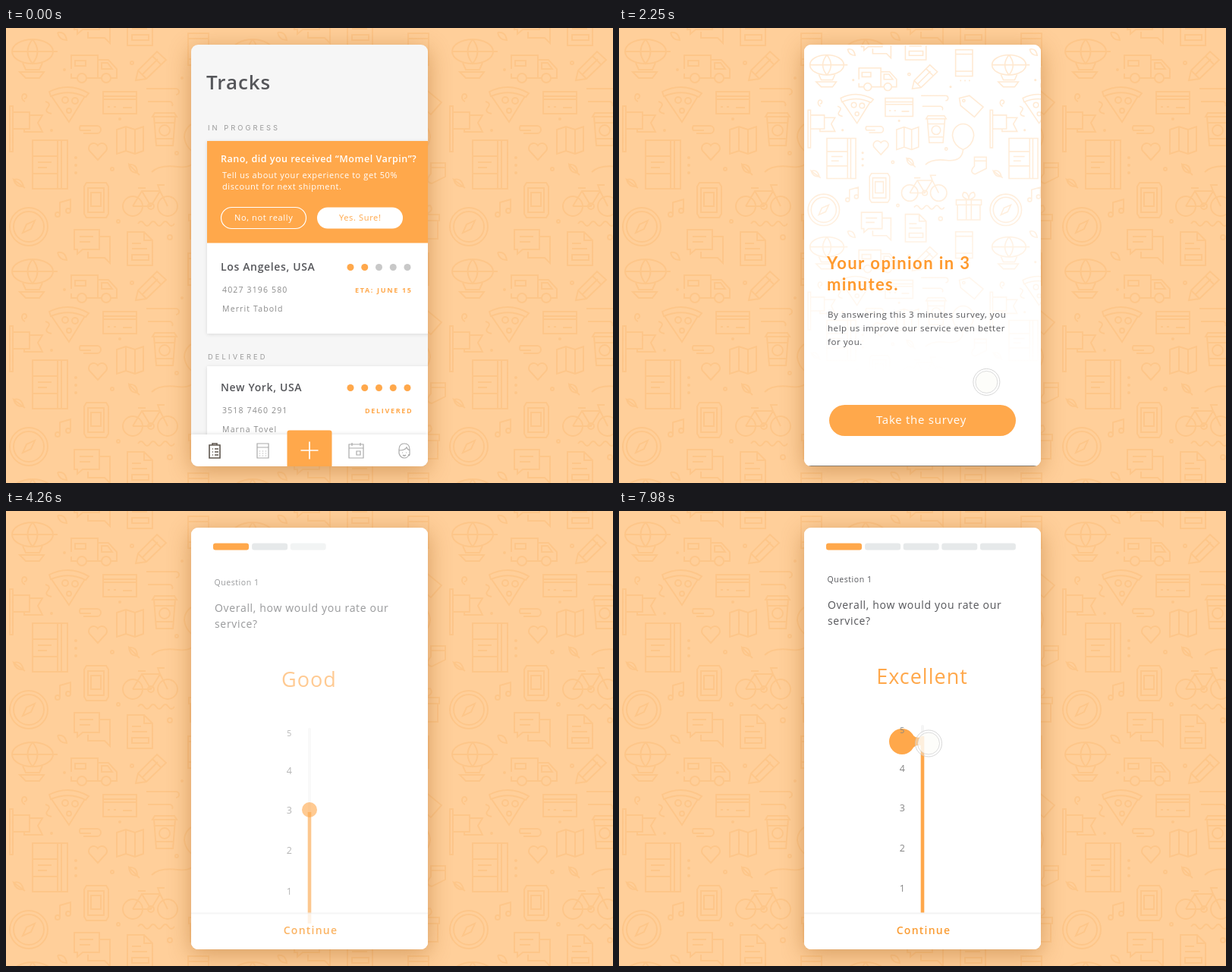
An HTML page with a canvas that plays this animation: 800 px wide and 600 px high, repeating every 8 s.

```html
<!DOCTYPE html>
<html lang="en">
<head>
<meta charset="utf-8">
<title>Delivery survey</title>
<style>
html, body { margin: 0; width: 100%; height: 100%; overflow: hidden; background: #ffcf9a; }
canvas { display: block; }
</style>
</head>
<body>
<canvas id="stage" width="800" height="600"></canvas>
<script>
const ctx = document.getElementById('stage').getContext('2d');
const LOOP = 8000, ORANGE = '#ffa84b', GREY = '#e6e9ea', INK = '#55565a';
const SANS = '"Open Sans", sans-serif';

// Timing helpers
const clamp = v => Math.max(0, Math.min(1, v));
const span = (t, start, end) => clamp((t - start) / (end - start));
const lerp = (a, b, p) => a + (b - a) * p;
const inOut = p => p < .5 ? 2 * p * p : 1 - 2 * (1 - p) ** 2;
const outQuart = p => 1 - (1 - p) ** 4;
const outBack = p => 1 + 2 * (p - 1) ** 3 + (p - 1) ** 2;

// Drawing helpers
function text(s, x, y, size, gap, color, weight = 400, font = SANS) {
  ctx.font = `${weight} ${size}px ${font}`;
  ctx.letterSpacing = gap + 'px';
  ctx.fillStyle = color;
  ctx.fillText(s, x, y);
}
function centered(...args) {
  ctx.textAlign = 'center';
  text(...args);
  ctx.textAlign = 'left';
}
function box(x, y, w, h, color, r = 0) {
  ctx.beginPath();
  ctx.roundRect(x, y, w, h, r);
  ctx.fillStyle = color;
  ctx.fill();
}
function disc(x, y, r, color) {
  ctx.beginPath();
  ctx.arc(x, y, r, 0, 7);
  ctx.fillStyle = color;
  ctx.fill();
}
function ring(x, y, r, color, width = 1) {
  ctx.beginPath();
  ctx.arc(x, y, r, 0, 7);
  line(null, color, width);
}
function line(path, color, width) {
  ctx.strokeStyle = color;
  ctx.lineWidth = width;
  path ? ctx.stroke(path) : ctx.stroke();
}
function shadow(color, blur = 0, dy = 0) {
  ctx.shadowColor = color;
  ctx.shadowBlur = blur;
  ctx.shadowOffsetY = dy;
}
// Runs draw with its own opacity and vertical shift
function layer(alpha, dy, draw) {
  if (alpha <= 0) return;
  ctx.save();
  ctx.globalAlpha *= alpha;
  ctx.translate(0, dy);
  draw();
  ctx.restore();
}

// Repeating doodle tile, 290 by 290
const TILE = 290;
const o = (x, y, r) => `M${x - r} ${y}a${r} ${r} 0 1 0 ${2 * r} 0a${r} ${r} 0 1 0 ${-2 * r} 0`;
const doodles = new Path2D([
  'M8 31a27 16 0 1 0 54 0a27 16 0 1 0-54 0M8 31h60M35 15q-13 16 0 32q13-16 0-32M22 46l4 9h18l4-9M18 58h32l-6 8h-18z', // airship
  'M94 66h-8v-6M86 54v-18h35v30h-15M121 42h14l11 12v12h-8M126 66h-5M126 46h8l6 8h-14zM91 43h14v7h-14z', o(100, 66, 6), o(132, 66, 6), // truck
  'M171 69l3-13l25-25l12 11l-26 25zM174 56l11 11M193 37l11 11M180 61l20-20', // pencil
  'M57 84q26-13 52 2l-4 5q-22-11-46-1zM60 90l23 34l21-34', o(78, 95, 4), o(91, 96, 4), o(83, 109, 3), // pizza
  'M128 84h44v29h-44zM128 90h44M128 94h44M134 104h3M142 104h3M154 105h12', // card
  'M185 80h39a4 4 0 0 1 0 8M187 97h28a4 4 0 0 1 4 6',
  'M5 103v60h4v-60zM9 111h22v22h-22M31 115h17l-6 10l6 12h-24v-4', // flag
  'M193 117h32l-3-5h-26zM195 117l3 38h22l3-38M196 125h26M198 146h22', o(209, 135, 7), // cup
  'M112 135h-14a5 5 0 0 1 0-6h22a5 5 0 0 1 0 10h-18',
  'M146 134l12-4l12 4l11-4v32l-11 4l-12-4l-12 4zM158 130v32M170 134v32', // map
  'M121 174l-11-12a6 6 0 0 1 11-7a6 6 0 0 1 11 7z',
  'M35 148h46v64h-46zM68 148v64M73 148v64M35 169h33M35 192h33M42 177h18M42 184h12', // notebook
  'M106 204h26l3 5v36l-3 5h-26l-3-5v-36zM108 211h21v32h-21zM112 217h13v18h-13z', // ticket
  'M167 235l12-20h24l10 20M203 215l-3-8h9M179 215l12 20l12-20M191 235h-24M174 211h10', o(167, 235, 13), o(213, 235, 13), o(191, 235, 4), // bike
  'M71 246v-16l14-4v15', o(68, 246, 3), o(82, 241, 3),
  'M174 258q4-6 8 0t8 0t8 0t8 0t8 0t8 0',
  o(30, 262, 25), o(30, 262, 20), 'M22 270l5-11l11-5l-5 11z', // compass
  'M90 266h33v26h-22l-7 6v-6h-4zM123 275h14v35l-7-7h-22v-8M97 275h18M97 282h14', // chat
  'M160 269h22l11 11v33h-33zM182 269v11h11M166 284h12M166 291h20M166 299h22v7h-22z', // document
  'M240 7h27v42h-27zM240 14h27M240 41h27M247 56h2M254 56h2M261 56h2', // phone
  'M246 84l16-4l22 18l-14 16l-22-18z', o(253, 88, 2), // tag
  'M235 144a17 19 0 1 1 34 0q-2 16-17 22q-15-6-17-22zM252 166q-2 20-26 17t-34 7', // balloon
  'M270 178h19v18l-18 9q-8-2-4-9l3-4zM270 184h19', // sock
  'M241 246h40v8h-40zM243 254v24h36v-24M257 246v32M265 246v32M261 246q-14-4-8-12q8 0 8 12q0-12 8-12q6 8-8 12', // gift
  'M162 180q11-1 11 11q-10 0-11-11l14 14M10 200q10-3 13 9q-10 1-13-9l15 11M68 6q10-2 12 10q-10 0-12-10',
  'M24 93a3 3 0 1 0-2-5a6 6 0 0 0 3 9M52 97q8 2 3 8t5 8',
  o(92, 171, 1), o(92, 181, 1), o(92, 191, 1), o(140, 186, 2), o(216, 276, 3), o(150, 120, 1), o(77, 55, 1), o(166, 46, 2), o(60, 135, 1), o(232, 66, 1), o(148, 255, 2), o(225, 165, 2)
].join(''));

function pattern(cols, color) {
  for (let c = 0; c < cols; c++) for (let r = -1; r < 3; r++) {
    ctx.save();
    ctx.translate(c * TILE, r * TILE);
    line(doodles, color, 1.8);
    ctx.restore();
  }
}

// Backdrop never changes, so it is painted once
const backdrop = document.createElement('canvas').getContext('2d');
backdrop.canvas.width = 800;
backdrop.canvas.height = 600;
backdrop.fillStyle = '#ffcf9a';
backdrop.fillRect(0, 0, 800, 600);
for (const [x, y] of [0, 1, 2].flatMap(c => [-1, 0, 1, 2].map(r => [c * TILE, r * TILE]))) {
  backdrop.setTransform(1, 0, 0, 1, x, y);
  backdrop.strokeStyle = 'rgba(248,170,88,.26)';
  backdrop.lineWidth = 1.9;
  backdrop.stroke(doodles);
}

// Touch pointer: a pale disc inside a ring
function pointer(x, y, alpha = 1, r = 17.5) {
  layer(alpha, 0, () => {
    disc(x, y, r, 'rgba(255,255,255,.35)');
    disc(x, y, r - 3.5, 'rgba(253,252,248,.75)');
    ring(x, y, r - 3, 'rgba(200,200,200,.65)');
    ring(x, y, r, 'rgba(200,200,200,.75)');
  });
}
function ripple(x, y, p) {
  if (p > 0 && p < 1) layer(1 - p, 0, () => ring(x, y, 17.5 + 18 * p, 'rgba(240,225,205,.9)', 1.2));
}

// First screen: parcel list
function parcel(y, city, code, person, done, status, statusX) {
  text(city, 283, y + 4.5, 14, .65, INK, 600);
  for (let i = 0; i < 5; i++) disc(454 + i * 18.75, y, 4.5, i < done ? ORANGE : '#c8c8c8');
  text(code, 285, y + 33.5, 10.5, 1.15, '#8b8b8b');
  text(person, 285, y + 58.5, 10.5, 1.15, '#8b8b8b');
  text(status, statusX, y + 33, 9, 1.67, ORANGE, 700);
}
function card(y, h) {
  shadow('rgba(0,0,0,.12)', 5, 1);
  box(265, y, 300, h, '#fff');
  shadow('transparent');
}
const iconClip = new Path2D('M268 550h14v17h-14zM272 550v-2h6v2M272 555h1M275 555h5M272 559h1M275 559h5M272 563h1M275 563h5');
const iconsRest = new Path2D('M331 548h15v19h-15zM331 553h15M334 558h1M338 558h1M342 558h1M334 561h1M338 561h1M342 561h1M334 564h1M338 564h1M342 564h1'
  + 'M452 549h19v18h-19zM452 554h19M456 547v4M467 547v4M462 558h5v5h-5z'
  + 'M518 556q0-8 7-8t7 8v6q0 2-2 2M518 556v5q2 6 7 6t6-5M518 557q8 0 10-4q1 3 4 4M522 560h1M527 560h1M523 563q2 2 4 0');

function tracks(t) {
  const p = span(t, 1185, 1535), a = 1 - p, heading = '#9a9a9a';
  layer(a, 13 * p, () => {
    text('Tracks', 264, 81, 26, .9, INK, 600);
    text('IN PROGRESS', 266, 135, 9.3, 3.05, heading, 400, 'Inter, sans-serif');
  });
  layer(a, 7 * p, () => {
    card(149, 254);
    box(265, 149, 300, 134.5, ORANGE);
    text('Rano, did you received “Momel Varpin”?', 283, 177, 12.5, .5, '#fff', 600);
    text('Tell us about your experience to get 50%', 285, 198, 11, .6, '#fff');
    text('discount for next shipment.', 285, 212.5, 11, .6, '#fff');
    ctx.beginPath();
    ctx.roundRect(283.5, 236.5, 112, 28, 14);
    line(null, '#fff', 1.2);
    box(410, 236.5, 113, 28, '#fff', 14);
    text('No, not really', 301, 254, 11, .65, '#fff');
    text('Yes. Sure!', 439, 254, 11, .65, ORANGE);
    parcel(315.5, 'Los Angeles, USA', '4027 3196 580', 'Merrit Tabold', 2, 'ETA: JUNE 15', 460);
    text('DELIVERED', 266, 436.5, 9.3, 3.15, heading, 400, 'Inter, sans-serif');
    card(446, 140);
    parcel(474.5, 'New York, USA', '3518 7460 291', 'Marna Tovel', 5, 'DELIVERED', 473);
  });
  layer(a, 13 * p, () => {
    shadow('rgba(0,0,0,.1)', 5, -1);
    box(244, 536, 312, 60, '#fff');
    shadow('transparent');
    box(370.5, 530.5, 59, 60, ORANGE, 3);
    line(new Path2D('M400 545.5v23M388.5 557h23'), '#fff', 1.7);
    line(iconClip, '#5d564e', 1.6);
    line(iconsRest, '#a9a9a9', 1.2);
  });
}

// Second screen: survey invitation
function survey(t) {
  const enter = span(t, 1380, 1620), leave = span(t, 2830, 3180);
  const a = enter * (1 - leave), dy = 10 * (1 - enter);
  layer(a, 0, () => {
    ctx.save();
    ctx.translate(245, 23);
    ctx.scale(.8276, .8276);
    const fade = ctx.createLinearGradient(0, 0, 0, 520);
    fade.addColorStop(0, 'rgba(255,180,100,.3)');
    fade.addColorStop(.5, 'rgba(255,180,100,.22)');
    fade.addColorStop(1, 'rgba(255,180,100,0)');
    ctx.beginPath();
    ctx.rect(0, 0, 380, 520);
    ctx.clip();
    for (let c = 0; c < 2; c++) for (let r = -1; r < 2; r++) {
      const tile = new Path2D();
      tile.addPath(doodles, new DOMMatrix([1, 0, 0, 1, c * TILE, r * TILE]));
      line(tile, fade, 1.9);
    }
    ctx.restore();
  });
  layer(a, dy, () => {
    text('Your opinion in 3', 274, 318, 22, 1.4, '#ff9a2e', 700, 'Lato, sans-serif');
    text('minutes.', 274, 346, 22, 1.4, '#ff9a2e', 700, 'Lato, sans-serif');
    ['By answering this 3 minutes survey, you', 'help us improve our service even better', 'for you.']
      .forEach((s, i) => text(s, 275, 381.5 + i * 18.2, 11.5, .56, INK));
  });
  if (t < 3500) layer(enter, dy, () => {
    const grow = inOut(span(t, 2760, 2950)), shrink = inOut(span(t, 2950, 3480));
    const w = lerp(246 + 16 * grow, 41, shrink), h = lerp(41 + 3 * grow, 41, shrink);
    box(400 - w / 2, 517.5 - h / 2, w, h, ORANGE, h / 2);
  });
  layer(a, dy, () => centered('Take the survey', 398.5, 521.5, 15, .75, '#fff'));
}

// The button leaps up and lands as the first progress segment
function leap(t) {
  const s = inOut(span(t, 3500, 3950));
  if (t < 3500) return;
  if (s < 1) {
    const along = (a, b, c) => (1 - s) ** 2 * a + 2 * s * (1 - s) * b + s * s * c;
    const dx = lerp(-70, -33.5, s), dy = lerp(-337, -133, s), stretch = clamp(s / .048);
    ctx.beginPath();
    ctx.ellipse(along(400, 330, 296.5), along(517.5, 180, 47),
      lerp(20.5 - 2.5 * stretch, 4.5, s * s), lerp(20.5 + 8.7 * stretch, 4.5, s * s),
      Math.atan2(dx, -dy), 0, 7);
    ctx.fillStyle = ORANGE;
    ctx.fill();
  } else {
    const w = lerp(9, 47, outQuart(span(t, 3950, 4080)));
    box(296.5 - w / 2, 42.5, w, 9, ORANGE, 3);
  }
}

// Third screen: rating slider
function knobY(t) {
  return 390 - 52 * inOut(span(t, 5190, 5670)) - 51 * inOut(span(t, 5920, 6220))
    + 17 * span(t, 7770, 7980) ** 2;
}
function slider(t) {
  const y = knobY(t), pop = outBack(span(t, 6540, 6930));
  const x = 400 - 27 * pop, r = 10 + 7 * pop, top = y + 3 - 10 * pop;
  box(398, 282, 4, 249, '#f5f5f5', 2);
  box(397.7, top, 4.6, 540 - top, ORANGE);
  disc(x, y, r, ORANGE);
  if (pop > .2) {
    const near = x + r * .88, reach = r * .45;
    ctx.beginPath();
    ctx.moveTo(near, y - reach);
    ctx.quadraticCurveTo(near + 5, y - 3, 402, y - 7);
    ctx.lineTo(402, y + 6);
    ctx.quadraticCurveTo(near + 5, y + 3, near, y + reach);
    ctx.fill();
  }
  [[5, 293, 10.5], [4, 343.5, 12.5], [3, 395.5, 12.5], [2, 448.5, 12.5], [1, 502, 12.5]]
    .forEach(([n, base, size]) => centered(String(n), 373.3, base, size, 0, '#858585'));
}
function question(t) {
  const p = span(t, 4050, 4400);
  for (let i = 1; i < 5; i++)
    layer(span(t, 4130 + 45 * i, 4210 + 45 * i), 0, () => box(273.5 + i * 50.6, 42.5, 47, 9, GREY, 3));
  layer(p, 10 * (1 - p), () => {
    text('Question 1', 274.5, 94, 10.5, .57, INK);
    text('Overall, how would you rate our', 275, 128.7, 14, .68, INK);
    text('service?', 275, 150.2, 14, .68, INK);
    [['Good', 0, 5400], ['Very Good', 5380, 6060], ['Excellent', 6040, 9000]].forEach(([s, from, to]) =>
      layer(span(t, from, from + 150) * (1 - span(t, to - 120, to)), 0,
        () => centered(s, 399.5, 228, 27, 1, ORANGE)));
    slider(t);
  });
  layer(span(t, 4000, 4340), 0, () => {
    box(244, 531, 312, 47, '#fff');
    box(244, 529.5, 312, 2, '#f3f3f3');
    centered('Continue', 401.5, 557.5, 14, 1.25, '#fa9d35', 600);
  });
}

function touches(t) {
  if (t < 1110) {
    const p = span(t, 60, 840), q = inOut(span(t, 840, 1080));
    pointer(lerp(577, 484, 1 - (1 - p) ** 2) + 7 * q, lerp(339, 276, inOut(p)) - 26 * q);
  }
  ripple(491, 250, span(t, 1110, 1400));
  if (t >= 1950 && t < 2770) {
    const p = span(t, 1950, 2730);
    pointer(lerp(577, 469, outQuart(p)), 466 + 40 * p ** 4);
  }
  ripple(469, 506, span(t, 2760, 2960));
  if (t >= 4600 && t < 5300) {
    const p = inOut(span(t, 4600, 5160));
    pointer(lerp(577, 408, p), lerp(420, 382, p), 1 - span(t, 5180, 5290));
  }
  if (t >= 6390)
    pointer(408, 291 + 15.5 * span(t, 7770, 7980) ** 2, lerp(.4, 1, span(t, 6540, 6700)), lerp(15.5, 17.5, span(t, 6540, 6700)));
}

function draw(t) {
  ctx.drawImage(backdrop.canvas, 0, 0);
  ctx.save();
  shadow('rgba(165,95,25,.45)', 30, 6);
  box(244, 22, 312, 556, '#f6f6f6', 9);
  shadow('transparent');
  ctx.clip();
  layer(span(t, 1300, 1600), 0, () => box(244, 22, 312, 556, '#fff'));
  if (t < 1540) tracks(t);
  if (t > 1380 && t < 3500) survey(t);
  leap(t);
  if (t > 4000) question(t);
  layer(span(t, 1450, 1600) * (1 - span(t, 4000, 4200)), 0, () => box(250, 577, 300, 1, '#8a7d6d'));
  touches(t);
  ctx.restore();
}

const begin = performance.now();
function tick() {
  draw((performance.now() - begin) % LOOP);
  requestAnimationFrame(tick);
}
tick();
</script>
</body>
</html>
```
